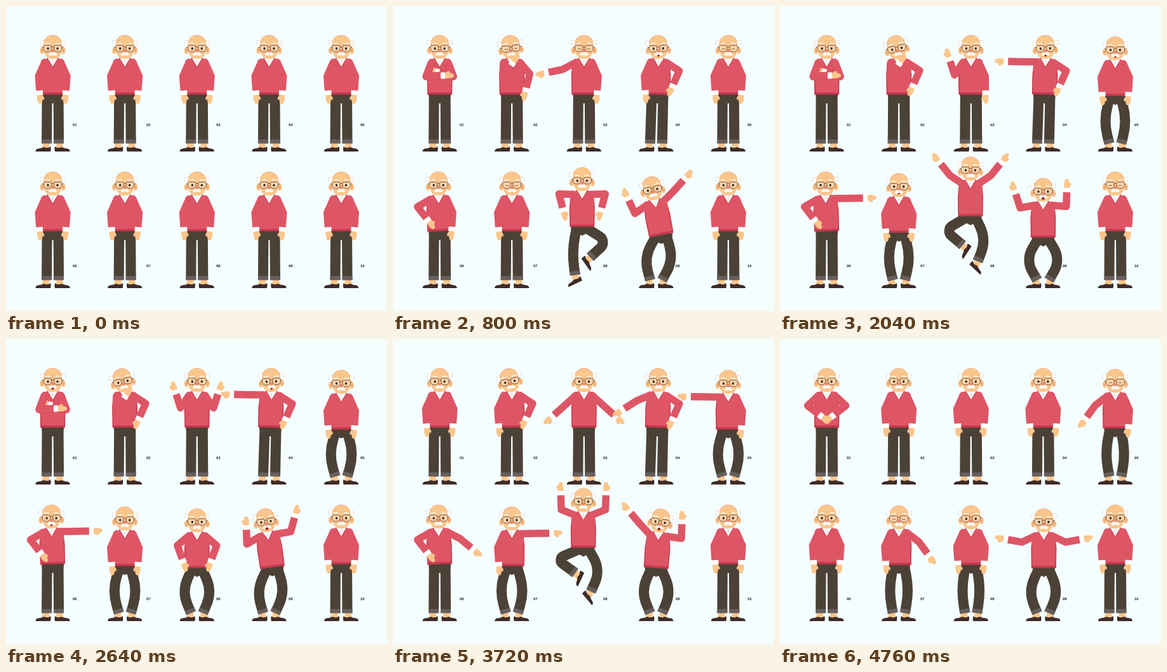
Animation of 600x480 px, one loop 4800 ms. Source, as an HTML page with a canvas:

```html
<!DOCTYPE html>
<html lang="en">
<head>
<meta charset="utf-8">
<title>Ten gestures</title>
<style>
  html, body { margin: 0; width: 100%; height: 100%; overflow: hidden; background: #f4fefe; }
  canvas { display: block; }
</style>
</head>
<body>
<canvas id="stage" width="600" height="480"></canvas>
<script>
const ctx = document.getElementById('stage').getContext('2d');
const LOOP = 4800, STEP = 40;
const RED = '#de5666', DARK_RED = '#c8374c', SKIN = '#fbc68c', SKIN_SHADE = '#eda877',
  PANTS = '#4b4137', CUFF = '#665f5d', SHOE = '#3d2c29', WHITE = '#ffffff', FRAME = '#6b4a3a';
const UPPER = 24, FORE = 22.5, LEG = 36.5, HIP_Y = 138.5;

// Limb angles: 0 hangs down, 90 points outward, 180 up. Feet: outward x, y, toe-down angle.
const DOWN = [24, -4], HIP = [57, -24], REACH = [74, 101], OUT = [91, 91], WAVE = [34, 162],
  SHRUG = [26, 132], BEND = [50, -20], FLAT = [9.5, 216, 0];
const REST = { L: DOWN, R: DOWN, x: 0, y: 0, lean: 0, tilt: 0, mouth: 0, lf: FLAT, rf: FLAT };
const both = angles => ({ L: angles, R: angles });
const leap = { ...both([135, 165]), x: -1, y: -28, lf: [14, 153, 65], rf: [11, 182, 50], mouth: 0 };

// Each move: start time, pose changes, duration (400 ms unless given).
const people = [
  { blinks: [1520], moves: [
    [300, { L: [21, -93], R: [21, -106] }], [2400, { mouth: 1 }, 120],
    [2800, { ...both(DOWN), mouth: 0 }], [4150, both([47, -52])]] },
  { blinks: [800], moves: [
    [300, { L: [4, -146] }], [600, { R: HIP, tilt: -12 }],
    [2850, { L: [60, -66] }], [3310, { L: DOWN }], [4150, { R: DOWN, tilt: 0 }]] },
  { blinks: [800], moves: [
    [340, { L: [62, 78] }], [1050, { L: WAVE }], [2000, { R: WAVE }],
    [2840, both(SHRUG)], [3330, both([48, 48])], [4050, both(DOWN)]] },
  { blinks: [], moves: [
    [340, { R: HIP, x: 2, lean: 2, tilt: -4, mouth: .9 }], [1100, { L: REACH }],
    [1540, { L: OUT }], [2900, { mouth: 0 }, 120],
    [3560, { L: DOWN }], [4150, { R: DOWN, x: 0, lean: 0, tilt: 0 }]] },
  { blinks: [800, 4760], moves: [
    [1100, { y: 2, mouth: 1 }], [1900, { y: 3, mouth: 0 }], [2870, { L: REACH }],
    [3300, { L: OUT }], [4540, { L: DOWN, y: 0 }]] },
  { blinks: [], moves: [
    [340, { L: [60, -38], lean: -2, tilt: 2 }], [1100, { R: REACH }], [1540, { R: OUT }],
    [2400, { mouth: .8 }, 120], [2850, { mouth: 0 }, 120],
    [3540, { R: DOWN }], [4150, { L: DOWN, lean: 0, tilt: 0 }]] },
  { blinks: [800, 4760], moves: [
    [1100, { y: 2, mouth: 1 }], [1900, { y: 3, mouth: 0 }], [2870, { R: REACH }],
    [3300, { R: OUT }], [4540, { R: DOWN, y: 0 }]] },
  { blinks: [], moves: [
    [200, { ...both(BEND), y: 5 }, 200],
    [420, { ...both([92, -15]), x: -3, y: -7, lf: [14, 208, 25], rf: [10, 180, 55] }, 320],
    [1050, leap],
    [1950, { ...both(BEND), x: 0, y: 6, lf: FLAT, rf: FLAT }],
    [2860, { ...both([158, 160]), y: -28, lf: [11, 181, 75], rf: [13, 143, 62], mouth: 1 }],
    [3290, { ...both(BEND), y: 2, lf: FLAT, rf: FLAT }, 190],
    [3490, { ...leap, ...both([112, 178]), y: -26 }, 220],
    [4050, { ...both(DOWN), x: 0, y: 1, lf: FLAT, rf: FLAT }]] },
  { blinks: [], moves: [
    [340, { L: [55, 155], R: [135, 138], x: 8, y: 6, lean: -11 }],
    [1050, { L: [80, 162], R: [85, 178], x: 0, y: 10, lean: 0, mouth: 1.2 }],
    [2200, { L: [60, 178], R: [100, 165], x: 5, y: 5, lean: -8 }],
    [2840, { L: [80, 162], R: [95, 178], x: 3, y: 10, lean: -2 }],
    [3300, { L: [137, 140], R: [82, 178], x: 0, y: 6, lean: 4, tilt: 5 }],
    [4200, { ...both([65, 100]), x: 1, y: 6, lean: 0, tilt: 0, mouth: 0 }]] },
  { blinks: [2100], moves: [] }
];

const rad = deg => deg * Math.PI / 180;
const mix = (a, b, k) => Array.isArray(a) ? a.map((v, i) => mix(v, b[i], k)) : a + (b - a) * k;

function poseAt(moves, t) {
  const pose = { ...REST };
  for (const [start, change, span = 400] of moves) {
    const u = Math.min(1, Math.max(0, (t - start) / span)), k = u * u * (3 - 2 * u);
    for (const key in change) pose[key] = mix(pose[key], change[key], k);
  }
  return pose;
}

function at(x, y, angle, flip, draw) {
  ctx.save();
  ctx.translate(x, y);
  ctx.scale(flip, 1);
  ctx.rotate(rad(angle));
  draw();
  ctx.restore();
}
function shape(d, color) {
  ctx.fillStyle = color;
  ctx.fill(new Path2D(d));
}
function line(d, color, width) {
  ctx.strokeStyle = color;
  ctx.lineWidth = width;
  ctx.stroke(new Path2D(d));
}
function oval(x, y, rx, ry, color, turn = 0) {
  ctx.beginPath();
  ctx.ellipse(x, y, rx, ry, turn, 0, 7);
  ctx.fillStyle = color;
  ctx.fill();
}

function leg(side, pose, [fx, fy, turn]) {
  const hx = 9 + side * pose.x, hy = 143 + pose.y;
  const reach = Math.hypot(fx - hx, fy - hy), d = Math.min(reach, 2 * LEG);
  const ux = (fx - hx) / reach, uy = (fy - hy) / reach;
  const bulge = Math.sqrt(LEG * LEG - d * d / 4);
  const kx = hx + ux * d / 2 + uy * bulge, ky = hy + uy * d / 2 - ux * bulge;
  const ax = hx + ux * d, ay = hy + uy * d;
  at(0, 0, 0, side, () => {
    at(ax, ay, turn, 1, () => {
      shape('M-4-3H5L8 8H-4Z', SKIN);
      shape('M-6 5Q-2 9 4 6Q9 8 14 8.500Q18 10 17.500 13H-6Q-7.500 9-6 5Z', SHOE);
    });
    ctx.beginPath();
    ctx.moveTo(hx, hy);
    ctx.arcTo(kx, ky, ax, ay, d * d / 6 / Math.max(bulge, .5));
    ctx.lineTo(ax, ay);
    ctx.strokeStyle = PANTS;
    ctx.lineWidth = 16;
    ctx.lineCap = 'butt';
    ctx.stroke();
    at(ax, ay, Math.atan2(kx - ax, ay - ky) * 180 / Math.PI, 1, () => shape('M-8-6H8V.5H-8Z', CUFF));
  });
}

function arm(side, pose, [a, b]) {
  const lean = rad(pose.lean), sx = side * 12.5, sy = -50;
  const x = pose.x + sx * Math.cos(lean) - sy * Math.sin(lean);
  const y = HIP_Y + pose.y + sx * Math.sin(lean) + sy * Math.cos(lean);
  const ex = UPPER * Math.sin(rad(a)), ey = UPPER * Math.cos(rad(a));
  const wx = ex + FORE * Math.sin(rad(b)), wy = ey + FORE * Math.cos(rad(b));
  at(x, y, 0, side, () => {
    at(wx, wy, -b, 1, () => {
      oval(-3.5, 11, 2, 4.5, SKIN_SHADE, .5);
      oval(-3.5, 10.5, 2, 4.5, SKIN, .5);
      shape('M-4 5H4Q6 13 3 20Q1 22-2 20Q-5 14-4 5Z', SKIN);
      shape('M-5-1H5V7H-5Z', WHITE);
    });
    const sleeve = `M0 0L${ex} ${ey}L${wx} ${wy}`;
    ctx.lineCap = 'butt';
    ctx.lineJoin = 'round';
    if (b < -90) line(sleeve, DARK_RED, 12.2);
    line(sleeve, RED, 11.5);
    oval(0, 0, 5.8, 5.8, RED);
  });
}

function torso() {
  shape('M-9-56H9L18-52L20-30L19.500 1H-19.500L-20-30L-18-52Z', DARK_RED);
  shape('M-9-56H9L18-52L18.500-30L18-2.500H-18L-18.500-30L-18-52Z', RED);
  shape('M-9-57H9L0-41Z', DARK_RED);
  shape('M-8-57H8L0-43Z', WHITE);
  line('M-7-55L-3-49L0-53L3-49L7-55M0-53V-46', '#d5d3d5', .7);
}

function head(mouth, blink) {
  for (const side of [-1, 1]) at(0, 0, 0, side, () => {
    oval(16.5, -12, 3.6, 5.5, SKIN);
    oval(16.8, -12, 1.6, 3, SKIN_SHADE);
    shape('M14-26Q17-30 20-27Q18-26 21-22Q17-23 16-18H14Z', WHITE);
    line('M14-27Q18-29 20-27Q18-26 21-22Q18-23 16-19', '#dfc9c4', .6);
  });
  shape('M0-36C9-36 14.500-30 14.500-22L13.500-9C12-2 6 1.500 0 1.500S-12-2-13.500-9L-14.500-22C-14.500-30-9-36 0-36Z', SKIN);
  line('M-13.500-26C-11-33-6-36 0-36S11-33 13.500-26', '#efa48c', .7);
  oval(0, -11, 2.4, 3, '#e98773');
  for (const side of [-1, 1]) at(0, 0, 0, side, () => {
    shape('M0-9Q4-10 7-5Q4-3 0-5Z', WHITE);
    line('M4-22Q8-25 12-22', WHITE, 1.5);
    ctx.beginPath();
    ctx.roundRect(2, -20, 12.5, 10, [2, 2, 5, 5]);
    ctx.fillStyle = '#ffffff40';
    ctx.fill();
    ctx.strokeStyle = FRAME;
    ctx.lineWidth = .9;
    ctx.stroke();
    if (blink) line('M5-15Q7.500-13 10-15', FRAME, .9);
    else oval(7.5, -15, 1.6, 2, '#2f2523');
  });
  line('M-2-17Q0-19 2-17M-14-17H-17M14-17H17', FRAME, .9);
  if (mouth > .05) oval(0, -4, 2.1 * mouth, 1.8 * mouth, '#a52a2c');
}

function person(pose, blink) {
  leg(-1, pose, pose.lf);
  leg(1, pose, pose.rf);
  at(pose.x, HIP_Y + pose.y, 0, 1, () => shape('M-18-2H18L17 6L0 15L-17 6Z', PANTS));
  at(pose.x, HIP_Y + pose.y, pose.lean, 1, () => {
    torso();
    at(0, -56.5, pose.tilt, 1, () => head(pose.mouth, blink));
  });
  arm(1, pose, pose.R);
  arm(-1, pose, pose.L);
}

const labelX = [105, 221, 331, 445, 558];

function draw(now) {
  const t = Math.floor(now % LOOP / STEP) * STEP;
  ctx.fillStyle = '#f4fefe';
  ctx.fillRect(0, 0, 600, 480);
  ctx.font = 'bold 6px "Liberation Sans", Arial, sans-serif';
  ctx.fillStyle = '#222';
  people.forEach((_, i) =>
    ctx.fillText(String(i + 1).padStart(2, '0'), labelX[i % 5], i < 5 ? 189 : 411));
  people.forEach(({ moves, blinks }, i) => {
    const blink = blinks.some(time => Math.abs(t - time) <= 80);
    at(73.6 + 113.6 * (i % 5), i < 5 ? 0 : 215, 0, 1, () => person(poseAt(moves, t), blink));
  });
}

const begin = performance.now();
function tick() {
  draw(performance.now() - begin);
  requestAnimationFrame(tick);
}
tick();
</script>
</body>
</html>
```
